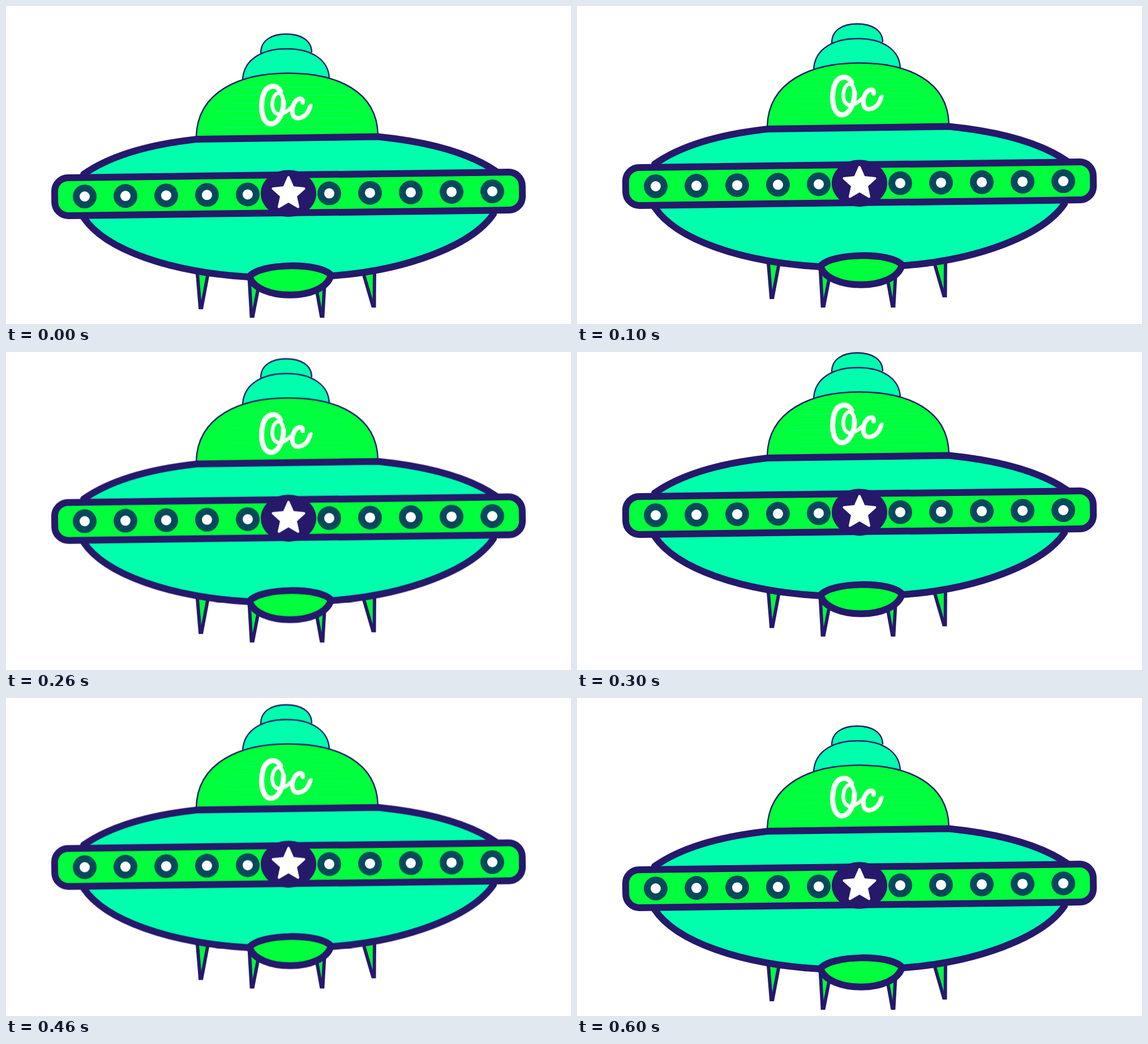
Animation, 998 px wide and 561 px high, one loop 0.7 s. Source, as an HTML page:

```html
<!DOCTYPE html>
<html lang="en">
<head>
<meta charset="utf-8">
<title>Hovering saucer</title>
<style>
  html, body { margin: 0; width: 100%; height: 100%; overflow: hidden; background: #fff; }
  svg { display: block; width: 100vw; height: 100vh; }
  .mint { fill: #00ffad; }
  .lime { fill: #00ff3c; }
  .thin, .leg, .thick { stroke: #26196b; }
  .thin { stroke-width: 2.4; }
  .leg { stroke-width: 6; }
  .thick { stroke-width: 12; stroke-linejoin: round; }
  .navy { fill: #26196b; }
  .ring { fill: #06485c; }
  .white { fill: #fff; }
  .star { fill: #fff; stroke: #fff; stroke-width: 4; stroke-linejoin: round; }
  .sheen { fill: none; stroke: #00ffad; stroke-width: 1; opacity: .45; }
  .script { fill: none; stroke: #fff; stroke-linecap: round; stroke-linejoin: round; }
</style>
</head>
<body>
<svg viewBox="0 0 998 561" preserveAspectRatio="none">
  <g id="ship">
    <path class="mint thin" d="M450 83C450 60 470 49.5 495 49.5C520 49.5 540 60 540 82"/>
    <path class="mint thin" d="M418 130C420 92 455 75.5 496 75.5C540 75.5 570 95 571 128"/>
    <path class="lime thin" d="M336 231C338 150 415 118.5 498 118.5C585 118.5 655 150 657 227"/>
    <g id="sheen" class="sheen"></g>

    <g class="lime leg">
      <path d="M337.5 466L343 532L345.5 532L358 466"/>
      <path d="M429 470L433.5 547L436 547L451 470"/>
      <path d="M543 470L557 547L559.5 547L564 470"/>
      <path d="M629 464L648 529L650.5 529L651 464"/>
    </g>

    <path class="mint thick" d="M137 297C185 263 255 244 337 235L657 230.5C750 240 820 260 866 292
      L861 367C823 423 705 467 575 476L430 478C290 470 175 430 137 373Z"/>
    <rect class="lime thick" x="86" y="298" width="826" height="67" rx="24" transform="rotate(-.72 499 331.5)"/>
    <g id="lights"></g>
    <ellipse class="navy" cx="499" cy="330.7" rx="49" ry="41.5"/>
    <polygon id="star" class="star"/>
    <path class="lime thick" d="M430 477C450 453 555 452 574 475C562 521 443 521 430 477Z"/>
  </g>

  <g id="letters" class="script" role="img" aria-label="Oc">
    <path stroke-width="9" d="M485 151C478 136 460 139 454 158C447 188 456 208 468 208C482 208 491 185 490 168"/>
    <path stroke-width="6.5" d="M490 170C489 150 477 149 472 163C467 180 474 192 484 191C492 190 499 184 505 178"/>
    <path stroke-width="8" d="M524 170C525 160 513 162 508 174C503 189 507 198 516 198C527 197 534 189 537 178"/>
    <path stroke-width="5.5" d="M535 184L539 175"/>
  </g>
</svg>

<script>
const STEP = 100;
const byId = id => document.getElementById(id);

function add(parent, tag, attrs) {
  const el = document.createElementNS("http://www.w3.org/2000/svg", tag);
  for (const key in attrs) el.setAttribute(key, attrs[key]);
  byId(parent).append(el);
}

// Portholes follow the tilt of the band, leaving the middle for the star.
for (let i = 0; i <= 10; i++) {
  if (i === 5) continue;
  const cx = 139 + 72 * i, cy = 336 - 0.9 * i;
  add("lights", "circle", { class: "ring", cx, cy, r: 21 });
  add("lights", "circle", { class: "white", cx, cy, r: 9 });
}

const corners = Array.from({ length: 10 }, (_, i) => {
  const r = i % 2 ? 13.5 : 29, a = i * Math.PI / 5;
  return [499 + r * Math.sin(a), 331 - r * Math.cos(a)];
});
byId("star").setAttribute("points", corners.join(" "));

// Faint streaks across the dome: left end, right end, height.
[[400, 560, 144], [382, 604, 158], [392, 594, 172],
 [368, 624, 186], [390, 610, 199], [368, 632, 214]].forEach(([x1, x2, y]) =>
  add("sheen", "line", { x1, x2, y1: y, y2: y - 1 }));

// Each height holds for one step, then jumps to the next.
function hop(id, heights) {
  const frames = [...heights, heights[0]].map((y, i) => ({
    transform: `translateY(${y}px)`,
    offset: i / heights.length,
    easing: "step-end"
  }));
  const anim = byId(id).animate(frames, { duration: STEP * heights.length, iterations: Infinity });
  anim.startTime = 0;
}

hop("ship", [0, -18, -37.5, -48, -37.5, -18, 0]);
hop("letters", [0, -16, -31, -48, -31, -14, 0]);
</script>
</body>
</html>
```
